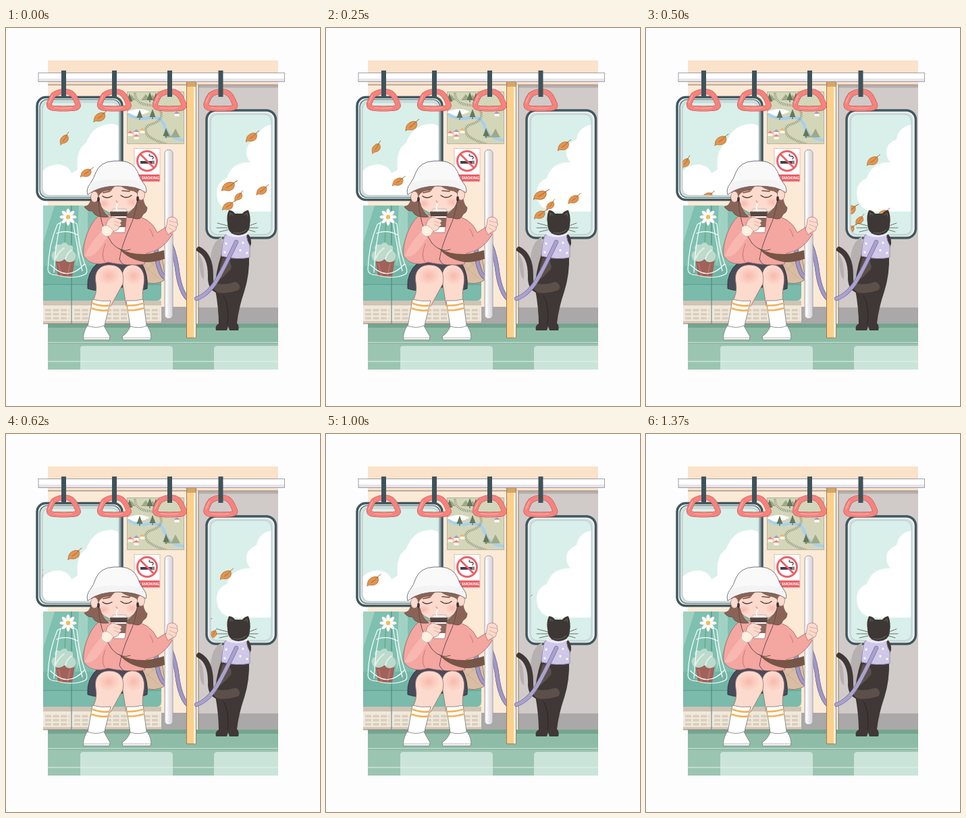
Write an HTML page that moves like this. It is 465 px wide and 560 px high and loops after 1.5 s.

```html
<!DOCTYPE html>
<html lang="en">
<head>
<meta charset="utf-8">
<title>Metro ride</title>
<style>
html, body { margin: 0; width: 100%; height: 100%; overflow: hidden; background: #fdfdfd; }
svg { display: block; width: 100vw; height: 100vh; }
.ln { fill: none; stroke-linecap: round; stroke-linejoin: round; }
</style>
</head>
<body>
<svg viewBox="0 0 465 560">
<defs>
  <clipPath id="leftGlass"><rect x="54" y="110" width="113" height="138" rx="10"/></clipPath>
  <clipPath id="rightGlass"><rect x="303" y="128" width="90" height="178" rx="10"/></clipPath>
  <clipPath id="mapClip"><rect x="180" y="95" width="83" height="76"/></clipPath>
  <linearGradient id="rail" x2="0" y2="1"><stop offset=".6" stop-color="#fff"/><stop offset=".7" stop-color="#e6e4ec"/></linearGradient>
  <linearGradient id="pole"><stop offset=".3" stop-color="#f3f2f4"/><stop offset="1" stop-color="#d4d1d6"/></linearGradient>
  <radialGradient id="blush"><stop stop-color="#f7a096" stop-opacity=".6"/><stop offset="1" stop-color="#f9a79c" stop-opacity="0"/></radialGradient>
  <g id="leaf" class="ln">
    <path d="M-10 8Q-10-1-4-4Q1-7 6-5Q8 0 5 4Q1 8-4 7Q-7 6-10 8Z" fill="#e29550" stroke="#a8682f" stroke-width=".7"/>
    <path d="M-4 3Q2 0 5-5L10-9" stroke="#a8682f"/>
  </g>
  <path id="ring" class="ln" d="M-15 36Q-8 31 2 31Q12 31 17 41L21 50Q23 56 11 56Q0 57-12 56Q-24 56-21 48Q-19 41-15 36Z"/>
  <g id="strap">
    <use href="#ring" stroke="#b9545a" stroke-width="8"/>
    <use href="#ring" stroke="#f7827c" stroke-width="6.800"/>
    <path d="M-17 37L-22 48M-14 55Q0 57 12 55" class="ln" stroke="#fda9a0" stroke-width="1.5"/>
    <path d="M-3.5 0H3.5V39H-3.5Z" fill="#40525a"/>
  </g>
  <path id="tree" d="M0-8L4.5 4H.7V7H-.7V4H-4.5Z"/>
  <g id="house"><path d="M-3.5 0H3.5V4H-3.5Z" fill="#fff5ec"/><path d="M-4.5 0L0-4L4.5 0Z"/></g>
</defs>

<!-- carriage -->
<path d="M62 48H403V440H62Z" fill="#fdead6"/>
<path d="M62 48H403V84H62Z" fill="#fbe2ca"/>
<path d="M284 84H403V414H284Z" fill="#d0cbc8"/>
<path d="M62 83.500H403V85H62Z" fill="#a89a92"/>
<path d="M284 85H403V88.500H284Z" fill="#b5aeab"/>
<path d="M284 414H403V439H284ZM230 413H268V439H230Z" fill="#aaa8a8"/>
<path d="M282 84H284.500V439H282Z" fill="#f7ebe0"/>
<path d="M285 84V439" stroke="#8c8584"/>

<!-- floor -->
<path d="M62 438H403V506H62Z" fill="#9bc5b1"/>
<path d="M62 438H403V466H62Z" fill="#8ebca7"/>
<path d="M62 438H403V444H62Z" fill="#74a48f"/>
<path d="M110 506V475Q110 471 115 471H242Q247 471 247 476V506ZM308 506V476Q308 471 313 471H403V506Z" fill="#cbe4d9"/>
<path d="M62 466H403M62 494H403" stroke="#e4f3ec" stroke-width="1.2"/>
<path d="M62 467.200H403" stroke="#769f8d" stroke-width=".8"/>

<!-- left window -->
<rect x="46" y="102.500" width="126" height="152" rx="13" fill="#edf3f2" stroke="#40585f" stroke-width="3.5"/>
<rect x="50" y="106" width="119" height="145" rx="11" fill="#d5e0df" stroke="#4f696e" stroke-width="1.2"/>
<g clip-path="url(#leftGlass)">
  <path d="M54 109H168V249H54Z" fill="#d8f0e9"/>
  <path d="M54 212Q62 203 77 202Q92 203 97 215L106 210Q103 180 119 170Q128 143 156 142Q162 142 168 146V249H54Z" fill="#fff"/>
  <g class="leaves" id="leftLeaves"></g>
</g>
<rect x="54" y="110" width="113" height="138" rx="10" fill="none" stroke="#b4c9c8"/>

<!-- right window -->
<rect x="297" y="122" width="102.500" height="189" rx="14" fill="#edf3f2" stroke="#40585f" stroke-width="3.5"/>
<rect x="300.500" y="125.500" width="95" height="183" rx="11" fill="#d5dedf"/>
<g clip-path="url(#rightGlass)">
  <path d="M302 127H394V307H302Z" fill="#d8f0e9"/>
  <path d="M394 143Q374 146 371 165Q355 171 356 186Q357 193 362 199Q335 198 327 222Q312 229 312 244Q312 266 333 272H394Z" fill="#fff"/>
  <g class="leaves" id="rightLeaves"></g>
</g>
<rect x="303" y="128" width="90" height="178" rx="10" fill="none" stroke="#b4c9c8"/>

<!-- map -->
<rect x="179.500" y="94.500" width="84" height="77" fill="#d3d6b8" stroke="#b6b59b"/>
<g clip-path="url(#mapClip)">
  <path d="M180 124Q197 116 213 124Q200 130 190 130L180 127Z" fill="#fff"/>
  <path d="M180 127Q195 137 212 133Q230 130 235 146Q241 165 264 166" fill="none" stroke="#a5cff0" stroke-width="4"/>
  <path id="track" d="M191 94Q190 112 211 114Q231 116 230 130Q227 140 213 143Q201 150 211 160Q220 167 238 172" fill="none" stroke="#8b927a" stroke-width="4" stroke-dasharray="1 1.5"/>
  <path d="M180 107L186 99L192 107ZM200 107L207 98L214 107ZM212 107L217 99L224 107ZM244 162L251 149L258 162ZM234 162L239 153L245 162Z" fill="#9eaa86"/>
  <g id="trees" fill="#65775d"></g>
  <g id="houses"></g>
</g>

<!-- sign -->
<rect x="190" y="178.500" width="38" height="49" fill="#fff" stroke="#c9bbb2" stroke-width=".8"/>
<path d="M190.500 217H227.500V227H190.500Z" fill="#ef5f67"/>
<path d="M199 197H216V201H199Z" fill="#40444b"/>
<path d="M217 197V201M219 197V201M217 194Q220 190 215 190Q210 190 213 187" class="ln" stroke="#40444b" stroke-width="1.3"/>
<circle cx="209" cy="197" r="14.500" fill="none" stroke="#ef5f67" stroke-width="3"/>
<path d="M199 187L219 207" stroke="#ef5f67" stroke-width="2.800"/>
<text x="209" y="224.200" text-anchor="middle" font-family="Open Sans, sans-serif" font-size="5.4" font-weight="700" fill="#fff">NO SMOKING</text>

<!-- seat -->
<path d="M55 263H192V381H55Z" fill="#7fc0b0"/>
<path d="M55 263H72L55 318ZM108 263H121V300L104 352Z" fill="#a0d2c3"/>
<path d="M55 366H225Q230 366 230 372V397Q230 404 224 404H55Z" fill="#7bbbab"/>
<path d="M55 352H130V380H55Z" fill="#73b5a5"/>
<path d="M130 366H222Q230 367 230 380H130Z" fill="#78b9a9"/>
<path d="M55 380H230" stroke="#569b8d"/>
<path d="M55 404H230V438H55Z" fill="#f1e8da"/>
<path d="M55 404H230V411H55Z" fill="#cfc3b5"/>
<path d="M55 434H230V438H55Z" fill="#d6c9ba"/>
<path d="M58 418H94M58 424H94M58 430H94M101 418H228M101 424H228M101 430H228" stroke="#d8cebf" stroke-width="3.5" stroke-dasharray="9 2.5"/>
<path d="M97 263V438" stroke="#507e76"/>
<path d="M55 438H230" stroke="#938278"/>

<!-- potted flower in a clear bag -->
<path d="M90 283Q86 306 88 345" class="ln" stroke="#6fa97d" stroke-width="1.500"/>
<path d="M73 343H102L98 368H77Z" fill="#a0625a"/>
<path d="M78 349L82 367M95 349L91 367" stroke="#b87469" stroke-width="2"/>
<path d="M70 344Q64 333 73 330Q69 319 81 321Q88 314 92 322Q101 320 99 330Q107 336 101 345Q90 350 87 342Q80 349 70 344Z" fill="#bddacd"/>
<path d="M74 341Q78 331 86 326M88 342Q91 333 97 329" class="ln" stroke="#e5f1e9" stroke-width="2"/>
<path d="M76 291Q63 322 62 358Q63 366 75 366Q100 373 117 365Q123 362 116 348Q108 325 105 290Q90 281 76 291ZM75 304Q91 298 107 307M66 351Q91 377 116 350M81 288Q73 320 71 362M99 286Q106 330 113 360" class="ln" stroke="#f7fffc" stroke-width="1.2"/>
<g id="daisy" fill="#fff" stroke="#cbdad5" stroke-width=".3"></g>
<circle cx="92" cy="280" r="3.200" fill="#f6bc52"/>

<!-- shoulder bag -->
<path d="M194 342L231 333L236 373Q220 383 202 375Z" fill="#d9bda3" stroke="#8b6c5e" stroke-width=".8"/>
<path d="M200 348L226 371M211 343L232 363M202 365L228 340" stroke="#c3a287" stroke-width=".7"/>

<!-- leash, passenger side -->
<path id="leash" d="M236 303Q218 318 224 345Q229 369 238 371M238 308Q249 327 253 354Q257 391 270 402" class="ln" stroke="#756b99" stroke-width="6.200"/>
<use href="#leash" id="leashTop"/>
<path d="M236 303Q218 318 224 345Q229 369 238 371M238 308Q249 327 253 354Q257 391 270 402" class="ln" stroke="#a198c6" stroke-width="4.800"/>

<!-- poles -->
<rect x="235" y="180.500" width="12" height="250" rx="5" fill="url(#pole)" stroke="#a5a1a8"/>
<path d="M238 184V427" stroke="#fff" stroke-width="2"/>
<path d="M267.500 80H281.500V459H267.500Z" fill="#fbd08b" stroke="#9c7b62"/>
<path d="M278 80H281V458.500H278Z" fill="#fff3dd"/>
<path d="M268 80H281V87H268Z" fill="#d6a567"/>

<!-- passenger -->
<g stroke-linejoin="round">
  <path d="M121 386Q119 362 137 347H200Q211 364 209 386Q198 391 186 384H160Q140 393 121 386Z" fill="#484c5a" stroke="#30333d"/>
  <path d="M140 277C125 285 113 317 115 337C122 349 135 352 151 347Q180 353 205 350L208 334Q232 330 246 306L237 295L224 303Q214 280 186 277Z" fill="#f4a6a1" stroke="#a8625f" stroke-width=".8"/>
  <path d="M116 338Q130 342 143 320L154 303L146 296Q129 312 116 338Z" fill="#f8b8b1"/>
  <path d="M146 346Q140 337 147 320M218 309Q216 302 213 298" class="ln" stroke="#c97673"/>
  <path d="M167 326Q181 335 205 335Q222 333 234 329L235 342Q222 347 206 347Q180 343 167 326Z" fill="#765546"/>

  <!-- legs -->
  <g stroke="#9b6d64" stroke-width=".8" fill="#fcdacd">
    <path d="M178 412L173 380C169 361 176 351 187 351C200 351 207 363 204 380Q201 395 203 407Z"/>
    <path d="M127 407Q136 393 133 377C130 361 139 351 153 351C170 351 176 363 173 379L155 412Z"/>
  </g>
  <ellipse cx="152" cy="367" rx="17" ry="14" fill="url(#blush)"/>
  <ellipse cx="189" cy="367" rx="14" ry="14" fill="url(#blush)"/>
  <g fill="#fff" stroke="#777" stroke-width=".8">
    <path d="M128 402Q142 406 155 404L144 448H120Z"/>
    <path d="M178 404Q191 405 203 402L209 448H185Z"/>
    <path d="M120 441Q134 446 145 441Q150 451 154 457L153 462H115Q113 454 120 441Z"/>
    <path d="M184 442Q198 446 209 441Q217 453 214 462H173L172 457Q180 452 184 442Z"/>
  </g>
  <path d="M128 408Q141 413 153 411M126 415Q139 420 151 418M179 411Q191 412 203 408M180 418Q191 419 204 415" class="ln" stroke="#f5b35e" stroke-width="2.800"/>
  <path d="M115 459H153M173 459H214" class="ln" stroke="#b8b5b8"/>

  <!-- head -->
  <g fill="#fcdacd" stroke="#a46e62" stroke-width=".8">
    <path d="M134 234Q131 256 141 266Q152 276 166 276Q186 275 195 260Q199 248 196 234Z"/>
  </g>
  <ellipse cx="145" cy="260" rx="10" ry="8" fill="url(#blush)"/>
  <ellipse cx="187" cy="258" rx="10" ry="8" fill="url(#blush)"/>
  <g fill="#8b6356" stroke="#5b4039" stroke-width=".7">
    <path d="M126 250Q126 263 116 265Q121 272 128 271Q132 282 152 280Q142 272 139 258Z"/>
    <path d="M203 246Q202 260 209 266Q209 273 203 276Q199 287 187 281Q176 282 180 276Q192 268 195 255Z"/>
  </g>
  <path d="M126 243Q144 230 166 232Q158 236 156 241Q142 240 138 248L134 257ZM166 232Q190 230 203 241L197 252Q194 240 183 241Q173 237 166 232Z" fill="#8b6356"/>
  <g fill="#fcdacd" stroke="#a46e62" stroke-width=".7">
    <ellipse cx="131" cy="250" rx="5.500" ry="8"/>
    <ellipse cx="200" cy="247" rx="5.500" ry="8"/>
  </g>
  <path d="M143 249Q149 254 157 249M170 248Q178 254 186 248" class="ln" stroke="#4a3432" stroke-width="1.3"/>
  <path d="M144 244L154 242M172 241L183 242" class="ln" stroke="#704c42" stroke-width="1.5"/>
  <path d="M163 256L165 258" class="ln" stroke="#ea9185" stroke-width="1.3"/>
  <path d="M121 247Q118 239 125 230Q130 223 133 214Q139 198 160 197H171Q188 198 195 213Q198 223 203 229Q210 238 207 244Q195 234 166 234Q137 234 121 247Z" fill="#f9f9f9" stroke="#666" stroke-width=".9"/>
  <path d="M125 230Q143 223 166 225Q188 223 203 230L206 242Q194 233 166 233Q138 233 122 245Z" fill="#f3f3f4"/>

  <!-- earphones -->
  <path d="M137 253Q137 291 157 319Q171 334 184 328M195 253Q192 277 183 296Q171 323 168 343Q174 355 184 351" class="ln" stroke="#54484b" stroke-width=".9"/>
  <path d="M137 252V256M195 251V255" class="ln" stroke="#393438" stroke-width="3.500"/>

  <!-- cup and hands -->
  <path d="M155 276H179L176 303H160Z" fill="#fff" stroke="#8b7772" stroke-width=".7"/>
  <path d="M157 281H178.500L177 295H159Z" fill="#8a685d"/>
  <path d="M154 272H180L179 279H155Z" fill="#584640"/>
  <path d="M156 272L159 268H177L180 272Z" fill="#f8f3f0" stroke="#8b7772" stroke-width=".5"/>
  <path d="M165 271Q162 266 165 261" class="ln" stroke="#fff" stroke-width="2"/>
  <path d="M150 286Q156 278 162 281L170 284Q173 287 169 289Q173 292 168 294Q168 298 163 300L155 303L147 295Z" fill="#fcdacd" stroke="#a46e62" stroke-width=".7"/>
  <path d="M160 286L168 289M160 291L167 294" class="ln" stroke="#c88f82" stroke-width=".6"/>
  <path d="M142 295Q149 288 159 300L155 307Q147 312 141 303Z" fill="#fff0df" stroke="#bd9a8c" stroke-width=".6"/>
  <path d="M236 299Q239 289 239 283Q243 278 250 281Q255 284 253 288Q256 292 252 295Q253 301 246 302L240 306Z" fill="#fcdacd" stroke="#a46e62" stroke-width=".7"/>
  <path d="M242 286L252 288M242 291L252 295M241 296L248 300" class="ln" stroke="#c88f82" stroke-width=".6"/>
</g>

<!-- cat -->
<g stroke-linejoin="round">
  <path d="M303 340Q306 315 320 309L319 345Q311 370 311 388Q300 365 303 340ZM286 336Q294 345 293 372Q286 370 286 336Z" fill="#b6b0ae"/>
  <path d="M314 389Q302 385 303 367Q303 337 286 328" class="ln" stroke="#3f3836" stroke-width="8"/>
  <path d="M319 335Q309 366 310 388Q315 416 315 438Q309 441 311 448H327L329 442L331 448H344Q346 442 342 437Q345 413 353 390Q361 365 360 335Z" fill="#3f3836"/>
  <path d="M306 374Q314 384 340 376Q349 380 345 388Q328 394 314 392Q305 388 306 374Z" fill="#5d5049"/>
  <path d="M326 341Q336 348 333 357Q325 366 318 372Q314 360 321 341Z" fill="#5d5049"/>
  <path d="M322 397Q331 410 328 439" class="ln" stroke="#2e2a29" stroke-width="1.2"/>
  <path d="M351 302Q364 305 363 320L359 330L350 316Z" fill="#3f3836"/>
  <path d="M324 307Q340 302 356 306Q357 316 361 322V340Q342 344 319 338Q320 319 324 307Z" fill="#cfc8e8" stroke="#847aa5" stroke-width=".8"/>
  <path d="M328 305Q342 311 356 305" class="ln" stroke="#eeeafa" stroke-width="4"/>
  <g id="dots" fill="#fff"></g>
  <path d="M328 289Q326 279 330 270Q336 270 339 275H350Q354 270 359 270Q363 280 361 291Q361 306 344 307Q328 306 328 289Z" fill="#3d3735"/>
  <path d="M332 278V274L336 277M353 277L357 274L358 279M337 303Q347 306 356 299" class="ln" stroke="#665c55" stroke-width="1.1"/>
  <path d="M328 293L313 289M328 296L312 296M329 299L316 302M360 293L371 289M360 296L373 296M359 299L369 302" class="ln" stroke="#55504e" stroke-width=".8"/>
</g>
<path d="M282 401Q301 395 316 367Q330 341 341 317" class="ln" stroke="#756b99" stroke-width="6.200"/>
<path d="M282 401Q301 395 316 367Q330 341 341 317" class="ln" stroke="#aaa1ce" stroke-width="4.800"/>

<!-- overhead rail -->
<rect x="48" y="66.500" width="364.500" height="13" fill="url(#rail)" stroke="#8d898f" stroke-width=".8"/>
<g id="straps"></g>
</svg>
<script>
const fill = (id, items, draw) =>
  document.getElementById(id).innerHTML = items.map(draw).join('');
const put = (shape, x, y, turn = 0, size = 1, extra = '') =>
  `<use href="#${shape}" transform="translate(${x} ${y}) rotate(${turn}) scale(${size})" ${extra}/>`;
const leaf = ([x, y, turn, size]) => put('leaf', x, y, turn, size);

fill('straps', [85.5, 160.5, 242.5, 318], x => put('strap', x, 63));
fill('leftLeaves', [[140, 131, 0, 1], [87, 164, -18, .85], [120, 214, 4, .9]], leaf);
fill('rightLeaves', [[365, 161, 0, .95], [331, 234, 8, 1.05], [380, 240, 0, .9],
  [345, 249, -14, .75], [330, 263, 4, .9]], leaf);
fill('trees', [[198, 129], [213, 103], [222, 104], [237, 156], [183, 105], [217, 128]], ([x, y]) => put('tree', x, y));
fill('houses', [[184, 156, '#ef8b7d'], [193, 154, '#a99aca'], [202, 152, '#f2b768'],
  [253, 127, '#a99aca'], [193, 161, '#ef8b7d']], ([x, y, c]) => put('house', x, y, 0, 1, `fill="${c}"`));
fill('daisy', [...Array(8).keys()], i =>
  `<ellipse cx="92" cy="273" rx="2.600" ry="5.500" transform="rotate(${i * 45} 92 280)"/>`);
fill('dots', [[326, 319], [334, 334], [351, 318], [347, 329], [357, 333], [324, 332]], ([x, y]) =>
  `<path d="M${x} ${y - 2}l.7 1.300 1.600.3-1.100 1 .2 1.600-1.400-.7-1.400.7.2-1.600-1.100-1 1.600-.3Z"/>`);

// Shared drift of every leaf, one pose per eighth of a second
const driftX = [0, 6, 12, 19, 28, 38, 49, 59, 69, 78, 87, 110];
const driftY = [0, 6, 13, 23, 35, 47, 61, 75, 86, 97, 109, 140];
const groups = document.querySelectorAll('.leaves');

function frame() {
  const t = performance.now() % 1500;
  const k = Math.min(11, Math.floor((Math.floor(t / 10) + .5) / 12.5));
  for (const g of groups) g.setAttribute('transform', `translate(${-driftX[k]} ${driftY[k]})`);
  requestAnimationFrame(frame);
}
frame();
</script>
</body>
</html>
```
